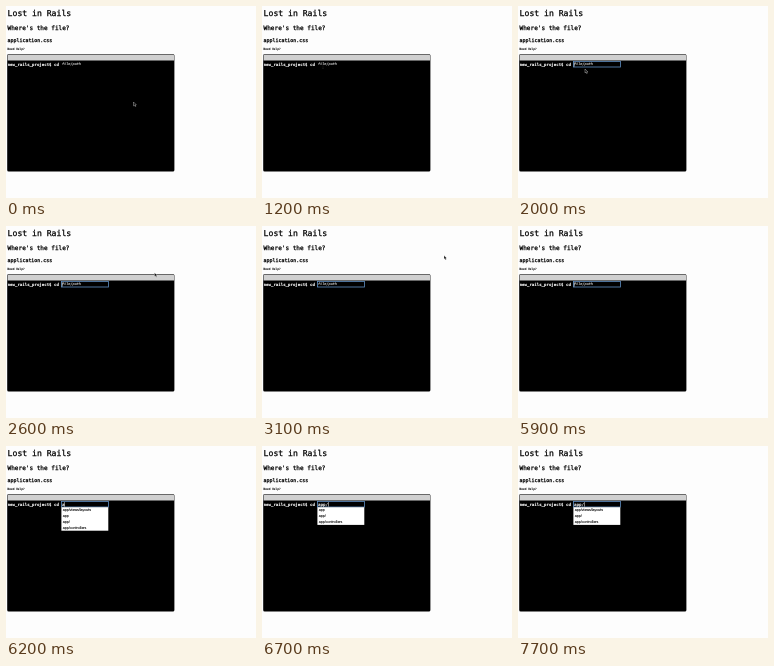
These frames come from a looping animation (250x192 px, 8 s). An HTML page:

```html
<!DOCTYPE html>
<html lang="en">
<head>
<meta charset="utf-8">
<title>Lost in Rails</title>
<style>
  html, body { margin: 0; width: 100%; height: 100%; overflow: hidden; background: #fdfdfd; }
  svg { display: block; width: 100vw; height: 100vh; }
  text { font-family: "DejaVu Sans Mono", monospace; text-rendering: geometricPrecision; white-space: pre; }
  .page text { fill: #000; stroke: #000; stroke-width: .25; }
  #menu text { font: 3.6px "Liberation Sans", Arial, sans-serif; fill: #111; stroke: #111; stroke-width: .1; }
</style>
</head>
<body>
<svg viewBox="0 0 250 192">
  <g class="page">
    <text x="1.6" y="10.3" font-size="8.15">Lost in Rails</text>
    <text x="1.6" y="23.7" font-size="6.05">Where's the file?</text>
    <text x="1.6" y="35.6" font-size="4.95">application.css</text>
    <text x="1.6" y="44.4" font-size="2.85" style="stroke-width:.1">Need Help?</text>
  </g>

  <rect x="1.2" y="48" width="167.2" height="117.5" rx="1.5" fill="#000"/>
  <path d="M1.6 54.6V49.6q0-1.1 1.1-1.1H166.9q1.1 0 1.1 1.1V54.6z" fill="#d0d0d0"/>

  <text x="1.7" y="59.5" font-size="4.05" font-weight="bold" fill="#fff" stroke="#fff" stroke-width=".1">new_rails_project$ cd</text>
  <rect id="ring" x="55.5" y="55.4" width="46.9" height="5.6" fill="none" stroke="#5f8fc4" stroke-width=".8"/>
  <text id="hint" x="56" y="59.3" font-size="3.5" font-style="italic" fill="#bbb" stroke="#bbb" stroke-width=".15">file/path</text>
  <text id="typed" x="56" y="59.5" font-size="4.2" font-weight="bold" fill="#fff"></text>
  <rect id="caret" y="56.1" width=".5" height="4.5" fill="#fff"/>

  <g id="menu"></g>

  <path id="beam" d="M-.8-2.5H.8M0-2.5V2.5M-.8 2.5H.8" fill="none" stroke="#777" stroke-width=".3" opacity=".5"/>
  <path id="arrow" d="M0 0V3.8L.9 3.1L1.6 4.5L2.3 4.2L1.7 2.8H2.8Z" fill="#000" stroke="#fff" stroke-width=".35"/>
</svg>
<script>
const LOOP = 8000, STEP = 100, FOCUS = 1600, HIDE_POINTER = 5900, FIRST_KEY = 6100;
const part = id => document.getElementById(id);
const show = (el, on) => { el.style.display = on ? '' : 'none'; };

// [time, x, y]
const pointerPath = [
  [0, 127.5, 96], [100, 126, 95], [300, 105, 83], [500, 80, 69], [700, 65, 61], [800, 61, 60],
  [1700, 61, 60], [1800, 65, 60], [1900, 65, 60], [2000, 67, 63], [2200, 84, 69], [2400, 118, 64],
  [2600, 148.5, 46.7], [2800, 157, 34], [2900, 164, 31], [3100, 182, 29.5], [3300, 191.2, 33.7]
];
const typing = [[0, ''], [FIRST_KEY, 'a'], [6300, 'ap'], [6400, 'app'], [6600, 'app/']];

const [views, app, slash, ctrl] = ['app/views/layouts', 'app', 'app/', 'app/controllers'];
const menus = [
  [0, []],
  [6200, [views, app, slash, ctrl]],
  [6700, [app, slash, ctrl]],
  [6800, [views, slash, ctrl]]
];

const latest = (table, t) => table.filter(row => row[0] <= t).pop();

function pointerAt(t) {
  const i = pointerPath.findIndex(p => p[0] > t);
  if (i < 0) return pointerPath.at(-1).slice(1);
  const [t0, x0, y0] = pointerPath[i - 1], [t1, x1, y1] = pointerPath[i];
  const k = (t - t0) / (t1 - t0);
  return [x0 + (x1 - x0) * k, y0 + (y1 - y0) * k];
}

function menuMarkup(items) {
  if (!items.length) return '';
  const rows = items.map((s, i) => `<text x="56.8" y="${65.1 + i * 5.8}">${s}</text>`).join('');
  return `<rect x="55.4" y="61.2" width="46.9" height="${items.length * 5.8 + .3}" fill="#fff"/>${rows}`;
}

function caretOn(t) {
  if (t < FOCUS) return false;
  const since = t >= 6700 ? 6700 : t >= FIRST_KEY ? t : FOCUS;
  return Math.floor((t - since) / 500) % 2 === 0;
}

let shownMenu;
function draw(now) {
  const t = Math.floor((now % LOOP) / STEP) * STEP;

  const [x, y] = pointerAt(t);
  const overField = t >= 700 && t < 2000;
  for (const id of ['arrow', 'beam']) part(id).setAttribute('transform', `translate(${x} ${y})`);
  show(part('arrow'), !overField && t < HIDE_POINTER);
  show(part('beam'), overField);

  const text = latest(typing, t)[1];
  part('typed').textContent = text;
  show(part('hint'), !text);
  show(part('ring'), t >= FOCUS);
  part('caret').setAttribute('x', 55.9 + text.length * 2.53);
  show(part('caret'), caretOn(t));

  const items = latest(menus, t)[1];
  if (items !== shownMenu) {
    part('menu').innerHTML = menuMarkup(items);
    shownMenu = items;
  }
}

const start = performance.now();
function tick() {
  draw(performance.now() - start);
  requestAnimationFrame(tick);
}
tick();
</script>
</body>
</html>
```
